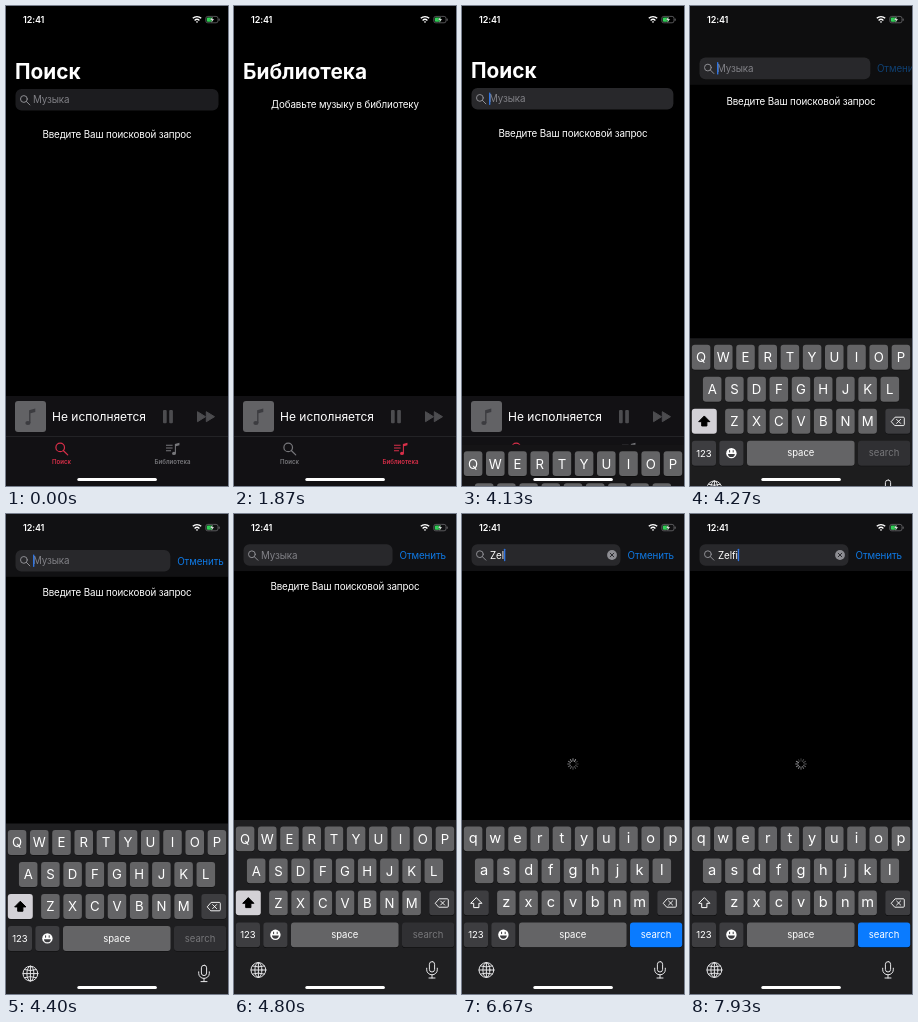
An HTML page that plays this animation: 222x480 px, repeating every 8 s.

```html
<!DOCTYPE html>
<html lang="ru">
<head>
<meta charset="utf-8">
<title>Поиск</title>
<style>
html, body { margin: 0; width: 100%; height: 100%; overflow: hidden; background: #000; }
svg { display: block; width: 222px; height: 480px; font: 9.8px Inter, "Liberation Sans", sans-serif; }
text { white-space: pre; }
</style>
</head>
<body>
<svg id="stage" viewBox="0 0 222 480"></svg>
<script>
const LOOP = 8000, FPS = 15;
const NS = 'http://www.w3.org/2000/svg';
const stage = document.getElementById('stage');

function el(parent, tag, attrs = {}, text) {
  const e = document.createElementNS(NS, tag);
  set(e, attrs);
  if (text !== undefined) e.textContent = text;
  parent.appendChild(e);
  return e;
}
function set(e, attrs) {
  for (const k in attrs) e.setAttribute(k, attrs[k]);
}
const group = (parent, attrs) => el(parent, 'g', attrs);
const rect = (parent, x, y, width, height, rx, fill) =>
  el(parent, 'rect', { x, y, width, height, rx, fill });
const label = (parent, x, y, text, attrs = {}) => el(parent, 'text', { x, y, fill: '#fff', ...attrs }, text);
const path = (parent, d, attrs) => el(parent, 'path', { d, fill: 'none', ...attrs });
const show = (e, on) => e.setAttribute('visibility', on ? 'inherit' : 'hidden');
const shift = (e, x, y) => e.setAttribute('transform', `translate(${x} ${y})`);
const mid = { 'text-anchor': 'middle' };
const round = { 'stroke-linecap': 'round', 'stroke-linejoin': 'round' };

function magnifier(parent, x, y, r, attrs) {
  const g = group(parent, { fill: 'none', 'stroke-linecap': 'round', ...attrs });
  el(g, 'circle', { cx: x, cy: y, r });
  const a = r * 0.72, b = r * 1.75;
  el(g, 'path', { d: `M${x + a} ${y + a}L${x + b} ${y + b}` });
}

function note(parent, x, y, s, color) {
  const g = group(parent, { transform: `translate(${x} ${y}) scale(${s})`, fill: color });
  el(g, 'ellipse', { cx: 2.4, cy: 15, rx: 2.6, ry: 2.1 });
  el(g, 'path', { d: 'M3.6 15V2.2L9.8 .5V4L5 5.3V15Z' });
}

// Pages
const big = { 'font-size': 20.8, 'font-weight': 700 };
const body = { ...mid, 'letter-spacing': '-.12' };
const tight = { 'letter-spacing': '-.1' };

const library = group(stage);
label(library, 9, 73.3, 'Библиотека', big);
label(library, 111, 101.5, 'Добавьте музыку в библиотеку', body);

const search = group(stage);
const bar = rect(search, 0, 0, 222, 111, 0, '#111113');
const title = label(search, 9, 73.3, 'Поиск', big);
const hint = label(search, 111, 132, 'Введите Ваш поисковой запрос', body);
const cancel = label(search, 165.5, 44.8, 'Отменить', { fill: '#0f79e4', ...tight });
const box = group(search);
const field = rect(box, 9.5, 83, 203, 21.6, 6);
magnifier(box, 17.9, 93, 3.4, { stroke: '#8e8e93', 'stroke-width': 1 });
const holder = label(box, 27, 97.4, 'Музыка', { fill: '#808086', ...tight });
const typed = label(box, 28, 97.4, '', tight);
const caret = rect(box, 27, 87.5, 1.4, 12.5, 0.6, '#2f73e0');
const clear = group(box);
el(clear, 'circle', { cx: 150, cy: 93.8, r: 4.9, fill: '#8e8e93' });
path(clear, 'M148.2 92l3.6 3.6m0-3.6l-3.6 3.6', { stroke: '#232326', 'stroke-width': 0.9, ...round });

const spinner = group(search, { transform: 'translate(111 250)' });
const spokes = Array.from({ length: 12 }, (_, i) => el(spinner, 'path', {
  d: 'M0-2.9V-5.3', stroke: '#c8c8cc', 'stroke-width': 1, 'stroke-linecap': 'round',
  transform: `rotate(${i * 30})`
}));

// Mini player
const DIM = '#4c4c4f';
const player = group(stage);
rect(player, 0, 390, 222, 90, 0, '#121114');
rect(player, 0, 430, 222, 0.6, 0, '#303033');
rect(player, 9, 395, 31, 31, 3, '#626265');
note(player, 19.5, 402, 1, '#3c3c40');
label(player, 46, 415.4, 'Не исполняется', { 'font-size': 12 });
rect(player, 157, 404, 3.7, 13.3, 1, DIM);
rect(player, 163.2, 404, 3.7, 13.3, 1, DIM);
path(player, 'M191.5 405.7V415.7L199.5 410.7ZM200.3 405.7V415.7L208.5 410.7Z',
  { fill: DIM, stroke: DIM, 'stroke-width': 1, 'stroke-linejoin': 'round' });

// Tabs
const small = { ...mid, 'font-size': 6.1, 'font-weight': 600, fill: 'currentColor' };
const tabA = group(player);
magnifier(tabA, 54.2, 441.4, 4.3, { stroke: 'currentColor', 'stroke-width': 1.2 });
label(tabA, 55.5, 458, 'Поиск', small);
const tabB = group(player);
path(tabB, 'M160 439.2h6.6m-6.6 2.8h6.6m-6.6 2.8h5', { stroke: 'currentColor', 'stroke-width': 1.1 });
note(tabB, 166.2, 436.3, 0.74, 'currentColor');
label(tabB, 166.5, 458, 'Библиотека', small);

// Keyboard
const PITCH = 22.2, KEY_W = 18.6, KEY_H = 24.9, ROW = 32;
const LIGHT = '#646466', DARK = '#3d3d40';
const kb = group(stage);
rect(kb, 0, 306, 222, 180, 0, '#121114');
const tint = rect(kb, 0, 306, 222, 180, 0, '#1f1f21');
const letters = [], keyAt = {};

function key(x, y, w, fill) {
  rect(kb, x, y + 0.7, w, KEY_H, 3, '#0c0c0d');
  return rect(kb, x, y, w, KEY_H, 3, fill);
}
[['qwertyuiop', 1.8], ['asdfghjkl', 12.9], ['zxcvbnm', 35.1]].forEach(([row, x0], r) => {
  [...row].forEach((c, i) => {
    const x = x0 + i * PITCH, y = 312.4 + r * ROW;
    key(x, y, KEY_W, LIGHT);
    keyAt[c] = [x, y];
    letters.push([label(kb, x + KEY_W / 2, 0, c, mid), c, y]);
  });
});
const shiftKey = key(1.8, 376.4, 25, DARK);
const arrow = path(kb, 'M14.3 383.6L19.9 389.3H16.9V393.6H11.7V389.3H8.7Z',
  { 'stroke-width': 1, 'stroke-linejoin': 'round' });
key(195.3, 376.4, 25, DARK);
path(kb, 'M201.5 389l3.6-4.2h8.2a1 1 0 0 1 1 1v6.4a1 1 0 0 1-1 1h-8.2ZM206.6 387l4 4m0-4l-4 4',
  { stroke: '#fff', 'stroke-width': 0.9, ...round });
const word = { ...mid, 'font-size': 9.5 };
key(1.8, 408.4, 24.2, DARK);
label(kb, 13.9, 424.2, '123', word);
key(29.3, 408.4, 24.2, DARK);
el(kb, 'circle', { cx: 41.4, cy: 420.8, r: 5.2, fill: '#fff' });
path(kb, 'M39.6 418.2v1.5m3.6-1.5v1.5', { stroke: DARK, 'stroke-width': 1, ...round });
path(kb, 'M38 421.6h6.8a3.4 3.1 0 0 1-6.8 0Z', { fill: DARK });
key(57, 408.4, 107.6, LIGHT);
label(kb, 110.8, 424, 'space', word);
const goKey = key(168, 408.4, 52.2, DARK);
const goText = label(kb, 194.1, 424, 'search', word);

const line = { fill: 'none', stroke: '#e6e6e8', 'stroke-width': 1, ...round };
el(kb, 'circle', { cx: 24.4, cy: 456, r: 7.4, ...line });
el(kb, 'ellipse', { cx: 24.4, cy: 456, rx: 3.5, ry: 7.4, ...line });
path(kb, 'M24.4 448.6v14.8M17 456h14.8M18.6 452q5.8 2 11.6 0M18.6 460q5.8-2 11.6 0', line);
el(kb, 'rect', { x: 195.4, y: 447.6, width: 5.2, height: 10.4, rx: 2.6, ...line });
path(kb, 'M192.7 454.2v1.6a5.3 5 0 0 0 10.6 0v-1.6M198 460.8v3.2m-3 0h6', line);

const popup = group(stage);
path(popup, `M-5.4-32H24a3.5 3.5 0 0 1 3.5 3.5V-10C27.5-4 18.6-5 18.6 1V${KEY_H - 3}
  a3 3 0 0 1-3 3H3a3 3 0 0 1-3-3V1C0-5-8.9-4-8.9-10V-28.5A3.5 3.5 0 0 1-5.4-32Z`, { fill: '#6b6b6d' });
const popText = label(popup, KEY_W / 2, -11, '', { ...mid, 'font-size': 21, 'font-weight': 300 });

// Status bar and home indicator
label(stage, 27.6, 16.9, '12:41', { ...mid, 'font-size': 9, 'font-weight': 600, ...tight });
path(stage, 'M186.8 12.3a6 6 0 0 1 8.4 0M188.6 14.4a3.5 3.5 0 0 1 4.8 0', { stroke: '#fff', 'stroke-width': 1.4 });
path(stage, 'M189.8 15.8a1.7 1.7 0 0 1 2.4 0L191 17.1Z', { fill: '#fff' });
el(stage, 'rect', { x: 199.8, y: 10.4, width: 12.2, height: 6.4, rx: 1.9, fill: 'none', stroke: '#77777a', 'stroke-width': 0.7 });
rect(stage, 212.7, 12.4, 0.9, 2.4, 0.4, '#77777a');
rect(stage, 200.8, 11.4, 5.8, 4.4, 1, '#32d158');
path(stage, 'M206.9 10.4L203.9 14H205.9L205 16.9L208.2 13.1H206.2Z', { fill: '#fff', stroke: '#000', 'stroke-width': 0.3 });
rect(stage, 71.3, 472.1, 79.6, 3, 1.5, '#fff');

// Motion
const WORD = 'Zelfi';
const HITS = [5200, 5667, 6267, 6733, 7267];
const HOLD = 66;
const clamp = (v, a, b) => Math.min(b, Math.max(a, v));
const spring = (ms, rate) => {
  const k = Math.max(0, ms) * rate / 1000;
  return 1 - (1 + k) * Math.exp(-k);
};
const ticks = ms => Math.round(ms * FPS / 1000);
const steps = (t, from, to) => clamp(ticks(t - from) + 1, 0, ticks(to - from) + 1);

let caps;
function setCaps(on) {
  if (on === caps) return;
  caps = on;
  for (const [e, c, y] of letters) {
    e.textContent = on ? c.toUpperCase() : c;
    set(e, { y: y + (on ? 17.4 : 16.6), 'font-size': on ? 13.2 : 14.6 });
  }
  set(shiftKey, { fill: on ? '#d3d1d6' : DARK });
  set(arrow, { fill: on ? '#000' : 'none', stroke: on ? '#000' : '#fff' });
}

function draw(t) {
  const onLib = t >= 1866 && t < 3066;
  show(library, onLib);
  show(search, !onLib);
  const RED = '#d92f49', GRAY = '#77777b';
  tabA.style.color = onLib ? GRAY : RED;
  tabB.style.color = onLib ? RED : GRAY;

  // Header slides up while the keyboard slides in
  const active = t >= 4133;
  const p = active ? spring(t - 4117, 13.4) : 0;
  const k = active ? spring(t - 4082.6, 18.25) : 0;
  shift(box, 0, -52.8 * p);
  set(field, { width: 203 - 54 * p, fill: active ? '#28282b' : '#1c1c1f' });
  shift(title, 0, -54 * p);
  set(title, { opacity: clamp(1.1 - 2.5 * p, 0, 1) });
  shift(hint, 0, -56 * p);
  set(bar, { height: 111 - 54 * p, opacity: clamp(p * 1.4, 0, 1) });
  shift(cancel, 53 * (1 - p), 52.8 * (1 - p));
  set(cancel, { opacity: clamp(p * p * 1.3, 0, 1) });
  show(cancel, active);
  shift(kb, 0, 174 * (1 - k));
  set(tint, { opacity: k });
  show(kb, active);

  // Typing
  const count = HITS.filter(h => t >= h + HOLD).length;
  typed.textContent = WORD.slice(0, count);
  show(holder, !count);
  show(hint, !count);
  show(clear, count > 0);
  show(spinner, count > 0);
  show(caret, active && (t < 4733 || t >= 5200));
  set(caret, { x: count ? 28 + typed.getComputedTextLength() : 27 });
  setCaps(!count);
  set(goKey, { fill: count ? '#0a7bff' : '#303033' });
  set(goText, { fill: count ? '#fff' : '#77777a' });

  const hit = HITS.findIndex(h => t >= h && t < h + HOLD);
  show(popup, hit >= 0);
  if (hit >= 0) {
    shift(popup, ...keyAt[WORD[hit].toLowerCase()]);
    popText.textContent = WORD[hit];
  }

  const n = steps(t, 6267, 6533) + steps(t, 6667, 7467) + steps(t, 7867, 7933);
  const head = Math.floor(n * 0.6) + 10;
  spokes.forEach((s, i) => set(s, { opacity: 0.2 + 0.55 * (1 - ((head - i + 24) % 12) / 12) }));
}

const start = performance.now();
function tick(now) {
  const t = Math.max(0, now - start) % LOOP;
  draw(Math.floor((t + 4) * FPS / 1000) * 1000 / FPS);
  requestAnimationFrame(tick);
}
draw(0);
requestAnimationFrame(tick);
</script>
</body>
</html>
```
